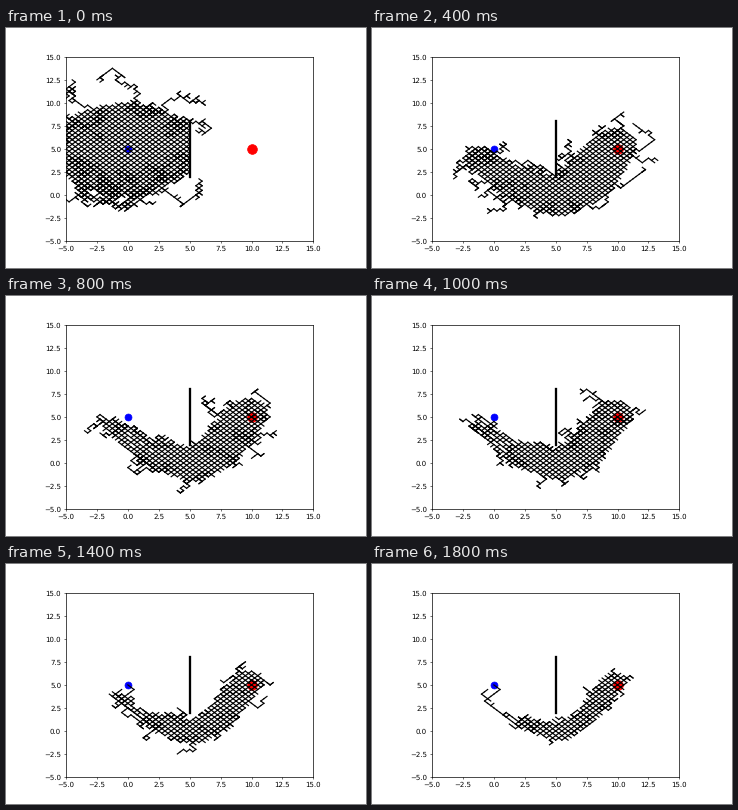
Animation, 360 px wide and 240 px high, one loop 2 s. Source, as a matplotlib script:

```python
import numpy as np
import matplotlib.pyplot as plt
from matplotlib.animation import FuncAnimation
from matplotlib.collections import LineCollection

STEP = 0.25  # horizontal and vertical size of one diagonal move
START, GOAL = (0, 5), (10, 5)
WALL_X, WALL_Y = 5, (2, 8)
FRAMES, INTERVAL = 10, 200

# Route around the wall: x, y, radius of the first and of the last valley.
SPINE = np.array([(-1.2, 4, 1.1, 0), (1.2, 1.7, 1.6, 0), (3.1, 0.6, 2, 0.7),
                  (5.3, -0.2, 2.1, 0.9), (7.3, 1.3, 2.3, 0.85),
                  (9.7, 5.3, 1.9, 1)])

# Long excursions that leave the explored region.
TRIPS = {
    0: [[(1, 9.5), (0.7, 12), (-0.5, 13), (-1.5, 13.8), (-2.7, 12.8)],
        [(4.8, 8), (6.2, 7.9), (6.4, 7), (5.3, 6.8)],
        [(2.5, 0), (4.3, -1.5), (5.3, 0), (5.8, 2)]],
    1: [[(5, 6.3), (6.5, 7.7), (9, 8.6), (10.5, 9.4), (11.7, 8.3)],
        [(5, 3.2), (6.2, 3.3), (7.8, 4.4)],
        [(0.8, -0.5), (2.2, -2.4), (4, -1.2), (6.8, -2.4)],
        [(3.5, 9.3), (2.7, 10.6), (0, 10.7), (-1.3, 11)]],
    2: [[(11, 4.3), (12.3, 3.6), (13.5, 3.9)]],
}
FINAL_PATH = [[START, (0.5, 4), (-0.5, 3), (1.5, 0.75), (2.25, 0.75),
               (3.25, 1.25)],
              [(-0.5, 4.25), (-1.25, 3.75), (-0.5, 3)]]


def node(i, j):
    return START[0] + i * STEP, START[1] + j * STEP


def cell(point):
    return [round((p - s) / STEP) for p, s in zip(point, START)]


def lattice():
    """All diagonal edges of the grid as cell pairs, and their slopes."""
    edges = [((i, j), (i + 1, j + dj))
             for i in range(-24, 60) for j in range(-36, 40)
             for dj in (1, -1) if (i + j) % 2 == 0]
    cells = np.array(edges)
    return cells, cells[:, 1, 1] - cells[:, 0, 1]


CELLS, SLOPES = lattice()
EDGES = CELLS * STEP + np.array(START)
X, Y = EDGES.mean(axis=1).T


def disc_depth(cx, cy, rx, ry, taper):
    """Depth inside a round region, wider below by `taper`, cut by the wall."""
    width = rx * (1 - taper * (Y - cy))
    depth = ry * (1 - np.hypot((X - cx) / width, (Y - cy) / ry))
    beside = (Y > WALL_Y[0]) & (Y < WALL_Y[1])
    return np.where(beside, np.minimum(depth, WALL_X - X), depth)


def valley_depth(progress):
    """Depth inside the corridor along the spine, which narrows over time."""
    s = np.linspace(0, len(SPINE) - 1, 80)
    sx, sy, wide, narrow = (np.interp(s, range(len(SPINE)), col)
                            for col in SPINE.T)
    radius = wide + (narrow - wide) * progress
    gap = np.hypot(X[:, None] - sx, Y[:, None] - sy)
    return (radius - gap).max(axis=1)


def wander(rng, start, length):
    """Random walk on the grid that stops at the wall."""
    edges, (i, j) = [], start
    for _ in range(length):
        ni, nj = i + rng.choice((-1, 1)), j + rng.choice((-1, 1))
        edges.append((node(i, j), node(ni, nj)))
        i, j = ni, nj
        x, y = node(i, j)
        if x == WALL_X and WALL_Y[0] <= y <= WALL_Y[1]:
            break
    return edges


def trail(rng, points, loose=0.0, twigs=0.0):
    """Walk through the points; `loose` is the share of random moves."""
    i, j = cell(points[0])
    j += (i + j) % 2
    edges = []
    for point in points[1:]:
        ti, tj = cell(point)
        while max(abs(ti - i), abs(tj - j)) > 1:
            di = np.sign(ti - i) or rng.choice((-1, 1))
            dj = np.sign(tj - j) or rng.choice((-1, 1))
            if rng.random() < loose:
                di, dj = rng.choice((-1, 1), 2)
            if rng.random() < twigs:
                edges.append((node(i, j), node(i + di, j - dj)))
            edges.append((node(i, j), node(i + di, j + dj)))
            i, j = i + di, j + dj
    return edges


def episode(k):
    rng = np.random.default_rng(40 + k)
    progress = max(0, (k - 2) / (FRAMES - 3))
    if k == 0:
        depth = disc_depth(-0.3, 5, 5.9, 4.9, 0)
    elif k == 1:
        depth = disc_depth(1.2, 4.3, 5.3, 5.1, 0.05)
    else:
        depth = valley_depth(progress)

    # Rising moves die out first on the long descent from the start.
    dropped = (X < 2) & (SLOPES > 0) & (rng.random(len(X)) < 0.8 * progress)
    edges = list(EDGES[(depth > 0) & ~dropped])

    # Random walks roughen the border.
    border = CELLS[(depth > 0) & (depth < 0.4), 0]
    count, length = (45, 40) if k < 2 else (40, int(18 - 14 * progress))
    for start in rng.choice(border, count):
        edges += wander(rng, start, length)
    for trip in TRIPS.get(k, []):
        edges += trail(rng, trip, loose=0.35 if k == 0 else 0.1, twigs=0.25)
    if progress > 0.6:
        for leg in FINAL_PATH:
            edges += trail(np.random.default_rng(3), leg, twigs=0.08)
    return edges


plt.rcParams["text.hinting"] = "none"
fig = plt.figure(figsize=(7.2, 4.8), dpi=50)
ax = fig.add_axes([60 / 360, 27 / 240, 247.4 / 360, 184.2 / 240])
ax.set(xlim=(-5, 15), ylim=(-5, 15))
ticks = np.arange(-5, 15.1, 2.5)
ax.set_xticks(ticks)
ax.set_yticks(ticks)
ax.spines[:].set_linewidth(1)

ax.plot(*START, "bo", ms=10)
ax.plot(*GOAL, "ro", ms=14)
ax.plot([WALL_X] * 2, WALL_Y, "k", lw=3.3)
walks = LineCollection([], colors="k", linewidths=1.7, capstyle="projecting",
                       zorder=3)
ax.add_collection(walks, autolim=False)

EPISODES = [episode(k) for k in range(FRAMES)]


def draw(k):
    walks.set_segments(EPISODES[k])
    return (walks,)


anim = FuncAnimation(fig, draw, frames=FRAMES, interval=INTERVAL,
                     repeat=True, repeat_delay=0)
plt.show()
```
